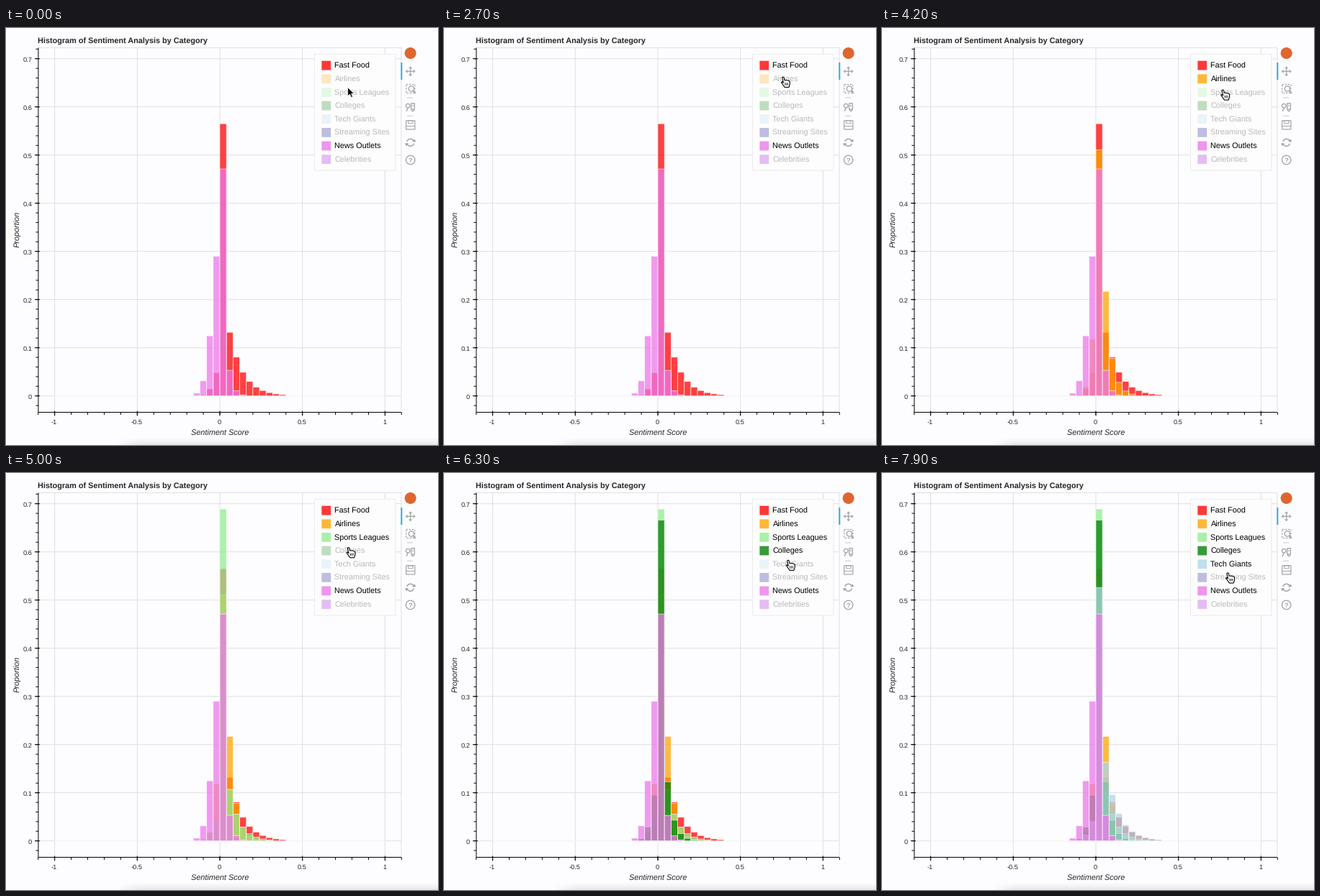
Animation, 600 px wide and 580 px high, one loop 8 s. Source, as a matplotlib script:

```python
import numpy as np
import matplotlib.pyplot as plt
from matplotlib.animation import FuncAnimation
from matplotlib.colors import to_rgb
from matplotlib.patches import Arc, Circle, Polygon, Rectangle

W, H, DPI = 600, 580, 100
FRAMES, STEP = 80, 100
PX = 72 / DPI
BG, GRID, ICON, INK = "#fdfcfe", "#e0dfe1", "#a1a6a9", "#262626"

plt.rcParams.update({"font.family": "Liberation Sans", "text.hinting": "none"})
fig = plt.figure(figsize=(W / DPI, H / DPI), dpi=DPI, facecolor=BG)
ax = fig.add_axes([0, 0, 1, 1])
ax.axis("off")


def sx(v):
    return 297 + 229.4 * v


def sy(v):
    return 511.7 - 670 * v


def row_y(row):
    return 51.9 + 18.65 * row


def ease(t, t0, t1):
    u = np.clip((t - t0) / (t1 - t0), 0, 1)
    return u * u * (3 - 2 * u)


def line(xs, ys, color="black", w=1.0, z=1, **kw):
    return ax.plot(xs, ys, color=color, lw=w * PX, zorder=z, snap=False,
                   solid_capstyle="butt", **kw)[0]


def text(x, y, s, size=10.85, color="black", ha="left", va="center_baseline", **kw):
    return ax.text(x, y, s, fontsize=size * PX, color=color, ha=ha, va=va, zorder=6, **kw)


def rect(x, y, w, h, fc="none", ec="none", lw=1.0, z=2, **kw):
    return ax.add_patch(Rectangle((x, y), w, h, fc=fc, ec=ec, lw=lw * PX, zorder=z,
                                  snap=False, **kw))


def circle(x, y, r, fc="none", ec=ICON, lw=1.3, z=3):
    ax.add_patch(Circle((x, y), r, fc=fc, ec=ec, lw=lw * PX, zorder=z))


def poly(points, fc=ICON, ec="none", lw=1.0, z=3):
    return ax.add_patch(Polygon(points, fc=fc, ec=ec, lw=lw * PX, zorder=z,
                                joinstyle="round"))


# Soft shadow along the bottom edge
gx, gy = np.meshgrid(np.linspace(0, 1, 450), np.linspace(0, 1, 12))
shade = np.zeros((12, 450, 4))
shade[..., 3] = 0.09 * gy ** 1.3 * np.clip(gx / 0.08, 0, 1)
ax.imshow(shade, extent=(150, 600, 580, 568), aspect="auto", zorder=0)
ax.set(xlim=(0, W), ylim=(H, 0))

# Plot frame, grid and axes
LEFT, RIGHT, TOP, BOTTOM = 44.9, 549, 27.5, 534.5
for v in np.arange(-1, 1.1, 0.5):
    line([sx(v)] * 2, [TOP, BOTTOM], GRID)
    line([sx(v)] * 2, [BOTTOM - 2, BOTTOM + 5], z=5)
    text(sx(v) - 0.4, 548, f"{v:g}", 9.3, INK, "center")
for v in np.arange(8) / 10:
    line([LEFT, RIGHT], [sy(v)] * 2, GRID)
    line([LEFT - 5, LEFT + 2], [sy(v)] * 2, z=5)
    text(36, sy(v) + 0.5, f"{v:g}", 9.3, INK, "right")
line([LEFT, RIGHT, RIGHT], [TOP, TOP, BOTTOM], GRID)
line([LEFT, LEFT, RIGHT], [TOP, BOTTOM, BOTTOM], z=5)
for v in np.arange(-11, 12) / 10:
    line([sx(v)] * 2, [BOTTOM, BOTTOM + 3.5], z=5)
for v in np.arange(-1, 37) / 50:
    line([LEFT - 3.5, LEFT], [sy(v)] * 2, z=5)
line([sx(-1), sx(1)], [sy(0)] * 2, "white", z=1.5, alpha=0.8)

text(44.5, 17.5, "Histogram of Sentiment Analysis by Category", color=INK, weight="bold")
text(297.3, 563, "Sentiment Score", color=INK, ha="center", style="italic")
text(16.5, 280, "Proportion", color=INK, ha="center", va="center",
     style="italic", rotation=90)

# name, colour, time shown, peak, (first bin, decay) on the left and on the right
SERIES = [
    ("Fast Food", "red", 0, .565, (.048, .3), (.132, .61)),
    ("Airlines", "orange", 3100, .511, (.118, .16), (.217, .36)),
    ("Sports Leagues", "lightgreen", 4400, .689, (.045, .4), (.107, .52)),
    ("Colleges", "green", 5700, .666, (.095, .3), (.123, .35)),
    ("Tech Giants", "lightblue", 7300, .526, (.040, .3), (.163, .59)),
    ("Streaming Sites", "navy", np.inf, 0, (0, 0), (0, 0)),
    ("News Outlets", "#ec78ea", 0, .471, (.290, .43), (.053, .2)),
    ("Celebrities", "darkviolet", np.inf, 0, (0, 0), (0, 0)),
]
BIN, ALPHA, FADE = 0.04, 0.74, 0.25
CLICKS = [s[2] for s in SERIES if 0 < s[2] < np.inf]


def heights(peak, left, right):
    """Bin heights that fall away from the peak, slower on the right."""
    k = np.arange(9)
    lows = left[0] * left[1] ** k[:4] ** 1.4
    highs = right[0] * right[1] ** k
    return dict(zip(range(-4, 10), [*lows[::-1], peak, *highs]))


# Legend and bars
rect(428.5, 36.5, 112.5, 161.5, "#fefdfe", "#ebeaec", z=5)
toggles = []
for row, (name, color, start, *shape) in enumerate(SERIES):
    y = row_y(row)
    pale = FADE * np.array(to_rgb(color)) + (1 - FADE) * np.array(to_rgb(BG))
    on = [rect(438.4, y - 6.2, 12.8, 12.8, color, z=6, alpha=ALPHA + 0.04),
          text(456.5, y, name)]
    off = [rect(438.4, y - 6.2, 12.8, 12.8, pale, z=6),
           text(456.5, y, name, color="#bab9bb")]
    on += [rect(sx(k * BIN), sy(h), BIN * 229.4, 670 * h, color, "white", 0.8,
                z=2 + row / 10, alpha=ALPHA)
           for k, h in heights(*shape).items() if h > 0.0015]
    toggles.append((start, on, off))

# Toolbar
CX = 561.7
circle(CX, 35, 8, "#e0662f", "none")
rect(548.4, 48, 1.9, 24, "#26aae1")

for d in np.array([(1, 0), (-1, 0), (0, 1), (0, -1)]):
    hub = np.array([CX, 60.3])
    tip, base, side = hub + 7 * d, hub + 4 * d, 2.6 * d[::-1]
    line(*zip(hub, base), ICON, 1.3)
    poly([tip, base + side, base - side])

rect(555.8, 78.5, 12, 12, ec=ICON, lw=1.2, ls=(0, (2, 1.4)))
circle(563, 84.5, 3.7, BG)
line([565.6, 568.8], [87.2, 91], ICON, 1.8, 3)
for y in (97, 122.3):
    line([557, 565], [y, y], "#c9cacc")

circle(558.2, 108.2, 2.8)
line([558.2, 556.2], [111, 115.8], ICON, 1.4)
rect(562.8, 104.7, 4.6, 8.5, ec=ICON, lw=1.3)
line([565.1, 565.1], [106.7, 109.2], ICON)
line([563, 565.1, 567.2], [114, 116, 114], ICON, 1.2)

rect(555.7, 128.8, 12.2, 12.2, ec=ICON, lw=1.2)
rect(558.7, 128.8, 6.3, 4, ec=ICON)
line([556, 568], [136.5, 136.5], ICON)

for s in (1, -1):
    start = 15 if s > 0 else 195
    ax.add_patch(Arc((CX, 159.3), 10, 10, theta1=start, theta2=start + 150,
                     ec=ICON, lw=1.5 * PX))
    poly([(CX + 2.5 * s, 159.3 - s), (CX + 7.5 * s, 159.3 - s), (CX + 6 * s, 159.3 - 5 * s)])

circle(CX, 183.5, 6.2)
text(CX, 183.7, "?", 9.5, ICON, "center", weight="bold")

# Pointers, drawn relative to their tips
ARROW = np.array([(0, 0), (0, 12.5), (2.9, 9.9), (4.9, 14.4), (7, 13.5),
                  (5.1, 9.1), (9, 9)])
HAND = np.array([(-1.3, 0.8), (0, 0), (1.3, 0.8), (1.9, 4.2), (6.8, 4.6), (9.3, 6),
                 (9.3, 10.2), (8, 14.2), (2.2, 14.2), (-2.6, 7.2), (-1.4, 6.5),
                 (0.4, 8)]) - (1.8, 0)
arrow = poly(ARROW, "black", "white", 0.9, 9)
hand = poly(HAND, "white", "black", 1.1, 9)
fingers = [line([0, 0], [0, 0], w=0.8, z=10) for _ in range(3)]
HAND_FROM = 1500


def pointer(t):
    """Drift up to the first faded row, then hop one row down after each click."""
    row = 1.8 - 0.8 * ease(t, 200, 800)
    row += sum(ease(t, c + 50, c + 550) for c in CLICKS)
    return np.array([470.5 + 2.3 * row, row_y(row) - 1.3 - row])


def update(i):
    t = i * STEP
    for start, on, off in toggles:
        for artist in on:
            artist.set_visible(t >= start)
        for artist in off:
            artist.set_visible(t < start)
    pos = pointer(t)
    is_hand = t >= HAND_FROM
    arrow.set_xy(ARROW + pos)
    hand.set_xy(HAND + pos)
    arrow.set_visible(not is_hand)
    for k, f in enumerate(fingers):
        f.set_data([pos[0] + 1 + 1.9 * k] * 2, [pos[1] + 8, pos[1] + 11.5])
    for artist in (hand, *fingers):
        artist.set_visible(is_hand)
    return []


anim = FuncAnimation(fig, update, frames=FRAMES, interval=STEP, repeat=True,
                     repeat_delay=0, blit=False)
plt.show()
```
